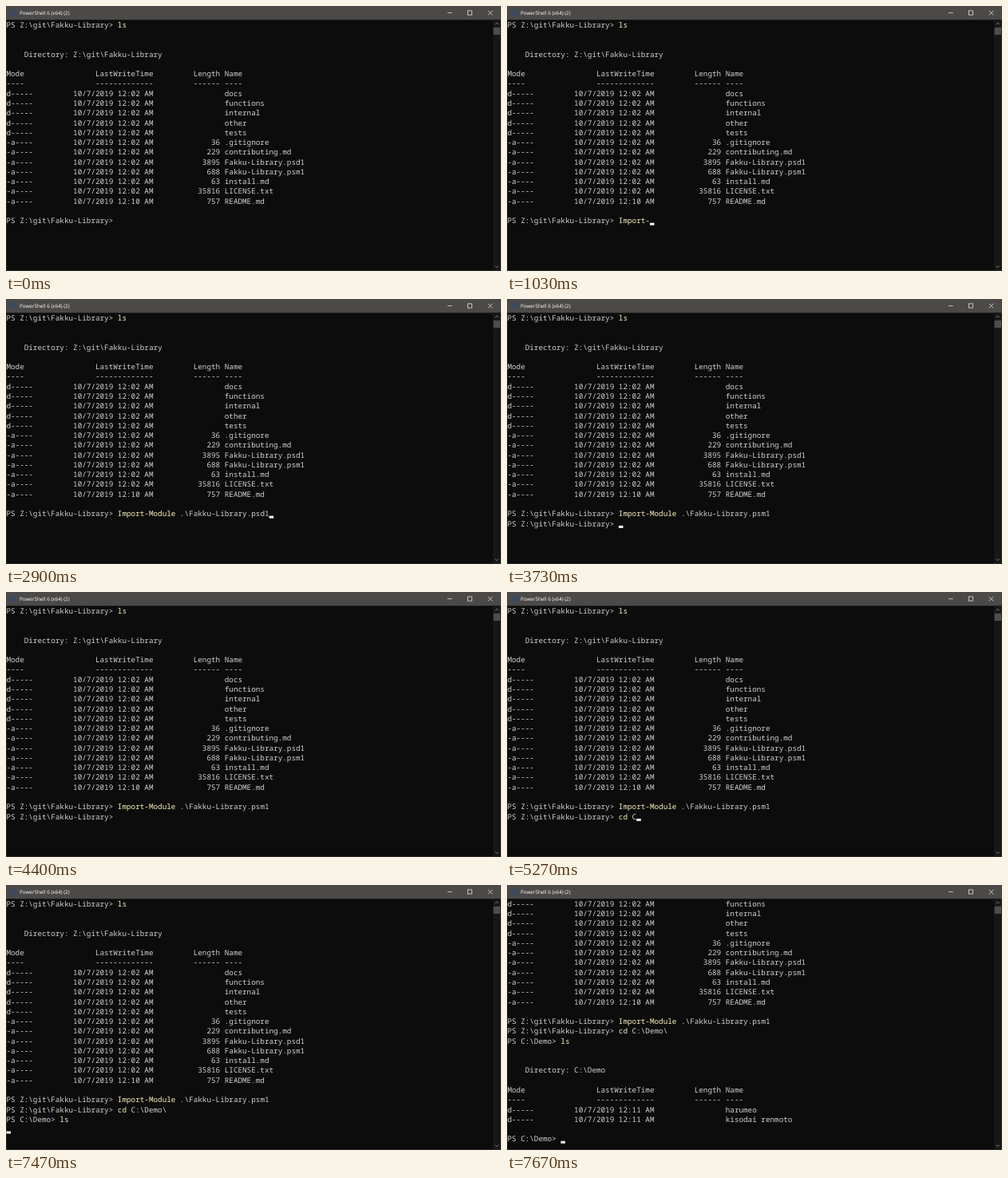
These frames come from a looping animation (620x332 px, 8000 ms). An HTML page:

```html
<!DOCTYPE html>
<html lang="en">
<head>
<meta charset="utf-8">
<title>Terminal</title>
<style>
  html, body { margin: 0; width: 100%; height: 100%; overflow: hidden; background: #0c0c0c; }
  svg { position: absolute; left: 0; top: 0; }
  text { text-rendering: geometricPrecision; }
  .title { font: 6.3px "Open Sans", sans-serif; fill: #fff; }
  #screen text {
    font: 9.3px "Noto Sans Mono", monospace; fill: #d0d0d0;
    white-space: pre; font-variant-ligatures: none;
  }
  #screen tspan { fill: #f7f1bb; }
</style>
</head>
<body>
<svg width="620" height="332" fill="none">
  <rect width="620" height="17.3" fill="#4c4a48"/>
  <rect x="5" y="4.5" width="8.5" height="8" fill="#3b4a5e"/>
  <text class="title" x="17" y="11.2">PowerShell 6 (x64) (2)</text>
  <g stroke="#f4f4f4" stroke-width=".7">
    <path d="M553 8.6h5.6M603.8 5.8l5.6 5.6m0-5.6l-5.6 5.6"/>
    <rect x="578.3" y="5.9" width="5.2" height="5.2"/>
  </g>
  <rect x="610" y="17.3" width="9.5" height="314" fill="#171717"/>
  <rect x="610.5" y="26.8" width="8.5" height="9.2" fill="#4d4d4d"/>
  <path d="M612.7 23.2l2.1-2.1l2.1 2.1M612.7 325.6l2.1 2.1l2.1-2.1" stroke="#8c8c8c" stroke-width=".9"/>
  <path d="M.3 17.3V331.7H619.7V17.3" stroke="#4c4a48" stroke-width=".6"/>
  <!-- the imperceptible skew keeps baselines at fractional heights -->
  <g id="screen" transform="skewY(.004)"></g>
  <rect id="cursor" width="5.58" height="3" fill="#f2f2f2"/>
</svg>
<script>
const LOOP = 8000, CHAR = 5.58, LINE = 12.275, LEFT = .4, TOP = 16.9, BASE = 9.9, ROWS = 25;
const screen = document.getElementById('screen');
const cursor = document.getElementById('cursor');

const repo = 'PS Z:\\git\\Fakku-Library> ';
const demo = 'PS C:\\Demo> ';

const columns = (mode, pad, date, size, name) =>
  mode.padEnd(pad) + date + String(size).padStart(15) + ' ' + name;
const entry = (name, size = '', time = '12:02') =>
  columns(size ? '-a----' : 'd-----', 15, `10/7/2019 ${time} AM`, size, name);
const listing = (path, entries) => [
  '', '', '    Directory: ' + path, '',
  columns('Mode', 20, 'LastWriteTime', 'Length', 'Name'),
  columns('----', 20, '-------------', '------', '----'),
  ...entries, ''
];
const command = (prompt, text) => prompt + text.replace(/^\S+/, '<tspan>$&</tspan>');

const history = [
  command(repo, 'ls'),
  ...listing('Z:\\git\\Fakku-Library', [
    ...['docs', 'functions', 'internal', 'other', 'tests'].map(n => entry(n)),
    entry('.gitignore', 36), entry('contributing.md', 229),
    entry('Fakku-Library.psd1', 3895), entry('Fakku-Library.psm1', 688),
    entry('install.md', 63), entry('LICENSE.txt', 35816),
    entry('README.md', 757, '12:10')
  ])
];
const result = listing('C:\\Demo', [
  entry('harumeo', '', '12:11'), entry('kisodai renmoto', '', '12:11')
]);

// Each session: prompt, time it appears, then [time, typed text, cursor shown]
const sessions = [
  [repo, 0, [
    [0, '', 0], [100, 'I', 0], [530, 'Im', 1], [670, 'Imp', 1], [770, 'Impo', 1],
    [870, 'Impor', 1], [970, 'Import', 1], [1030, 'Import-', 1],
    [1200, 'Import-m', 1], [1270, 'Import-mo', 1], [1330, 'Import-mod', 1],
    [1730, 'Import-Module', 1], [2270, 'Import-Module', 0], [2570, 'Import-Module ', 1],
    [2670, 'Import-Module .', 1], [2730, 'Import-Module .\\', 1],
    [2830, 'Import-Module .\\F', 1], [2900, 'Import-Module .\\Fakku-Library.psd1', 1],
    [3170, 'Import-Module .\\Fakku-Library.psm1', 1],
    [3330, 'Import-Module .\\Fakku-Library.psm1', 0]
  ]],
  [repo, 3700, [
    [3700, '', 0], [3730, '', 1], [4260, '', 0], [4670, 'c', 1], [4800, 'cd', 1],
    [4930, 'cd ', 1], [5270, 'cd C', 1], [5400, 'cd C:', 1], [5830, 'cd C:\\', 1],
    [5970, 'cd C:\\D', 1], [6030, 'cd C:\\De', 1], [6070, 'cd C:\\Dem', 1],
    [6130, 'cd C:\\Demo', 1], [6200, 'cd C:\\Demo\\', 1], [6500, 'cd C:\\Demo\\', 0]
  ]],
  [demo, 6670, [[6670, '', 0], [6700, '', 1], [7300, 'l', 1], [7370, 'ls', 1]]]
];
// [time, result lines printed]
const output = [[7470, 0], [7500, 3], [7530, 6], [7570, 8], [7600, 9]];
const promptBack = 7630, cursorBack = 7670;

const latest = (list, t) => list.filter(s => s[0] <= t).pop();

function stateAt(t) {
  const lines = [...history];
  let col = 0, shown = 0;
  for (const [prompt, start, steps] of sessions) {
    if (t < start) break;
    const [, text, on] = latest(steps, t);
    lines.push(command(prompt, text));
    col = prompt.length + text.length;
    shown = on;
  }
  let row = lines.length - 1;
  const printed = latest(output, t);
  if (printed) {
    lines.push(...result.slice(0, printed[1]));
    row = lines.length;
    col = 0;
    shown = printed[1] === 0;
    if (t >= promptBack) {
      lines.push(demo);
      col = demo.length;
      shown = t >= cursorBack;
    }
  }
  const scroll = Math.max(0, row + 1 - ROWS);
  return { lines: lines.slice(scroll), row: row - scroll, col, shown };
}

const textRow = (line, i) =>
  `<text x="${LEFT}" y="${(TOP + BASE + i * LINE).toFixed(2)}">${line}</text>`;

let last = '';
function draw(t) {
  const { lines, row, col, shown } = stateAt(t);
  const markup = lines.map(textRow).join('');
  if (markup !== last) screen.innerHTML = last = markup;
  cursor.setAttribute('x', LEFT + col * CHAR);
  cursor.setAttribute('y', TOP + (row + 1) * LINE - 3);
  cursor.setAttribute('visibility', shown ? 'visible' : 'hidden');
}

const begin = performance.now();
function tick() {
  draw((performance.now() - begin) % LOOP);
  requestAnimationFrame(tick);
}
tick();
</script>
</body>
</html>
```
